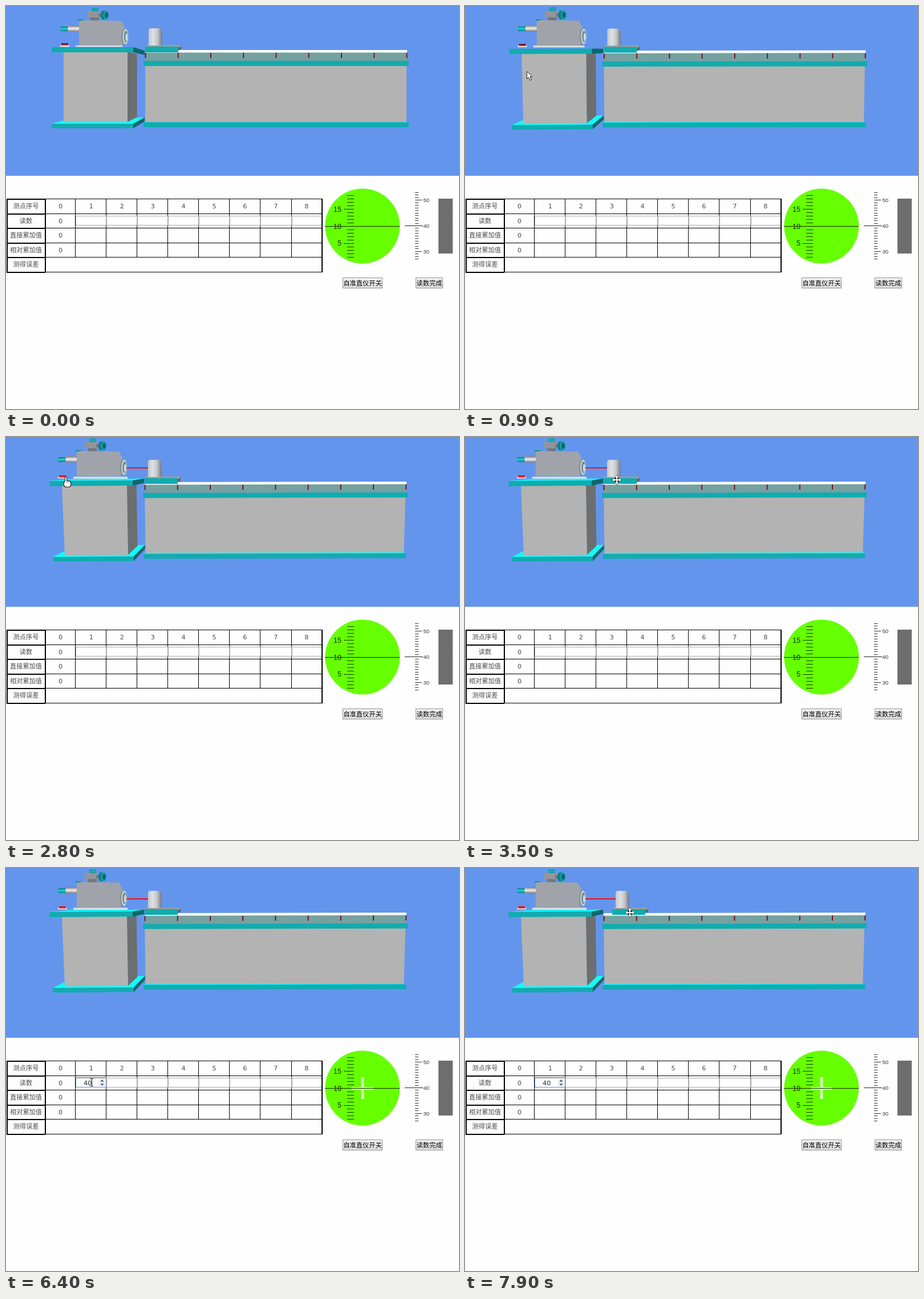
Write an HTML page with a canvas that moves like this. It is 794 px wide and 705 px high and loops after 8 s.

```html
<!DOCTYPE html>
<html lang="zh">
<head>
<meta charset="utf-8">
<style>
html, body { margin: 0; width: 100%; height: 100%; overflow: hidden; background: #fefefe; }
canvas { display: block; }
</style>
</head>
<body>
<canvas id="stage" width="794" height="705"></canvas>
<script>
const ctx = document.getElementById('stage').getContext('2d');
const LOOP = 8000, STEP = 100;
const TEAL = '#11acae', CYAN = '#14fafa', DARK_TEAL = '#0b686a', GREY = '#b3b3b3';
const SANS = '"DejaVu Sans", "Noto Sans CJK SC", "Noto Sans CJK", sans-serif';
const ARIAL = '"Liberation Sans", sans-serif';

// Pointer moves: start, end, target x, target y
const MOVES = [
  [100, 700, 116, 129], [700, 1300, 91, 83], [1300, 1600, 93, 68], [2000, 2100, 97, 67],
  [2700, 2800, 105, 69], [2800, 3200, 363, 62], [3200, 3500, 266, 75],
  [4100, 4300, 418, 310], [4300, 4500, 357, 366], [4500, 4900, 146, 375],
  [5300, 5500, 150, 375], [6900, 7000, 129, 375], [7200, 7600, 275, 78], [7600, 7900, 289, 78]
];

const mix = (a, b, k) => a + (b - a) * k;
const ramp = (t, a, b) => Math.max(0, Math.min(1, (t - a) / (b - a)));
const smooth = v => v * v * (3 - 2 * v);
const inside = (x, y, l, t, r, b) => x >= l && x <= r && y >= t && y <= b;
const colX = i => Math.floor(67.6 + i * 54.05);
const rowY = i => Math.round(337 + i * 25.6);

function rect(color, x, y, w, h) {
  ctx.fillStyle = color;
  ctx.fillRect(x, y, w, h);
}

function frame(color, x, y, w, h) {
  ctx.strokeStyle = color;
  ctx.lineWidth = 1;
  ctx.strokeRect(x + 0.5, y + 0.5, w - 1, h - 1);
}

function line(x1, y1, x2, y2, color = '#000', width = 1) {
  ctx.strokeStyle = color;
  ctx.lineWidth = width;
  ctx.beginPath();
  ctx.moveTo(x1, y1);
  ctx.lineTo(x2, y2);
  ctx.stroke();
}

function shape(points, fill, stroke) {
  ctx.beginPath();
  for (const [x, y] of points) ctx.lineTo(x, y);
  ctx.closePath();
  ctx.fillStyle = fill;
  ctx.fill();
  if (!stroke) return;
  ctx.strokeStyle = stroke;
  ctx.lineWidth = 1;
  ctx.stroke();
}

function ellipse(color, x, y, rx, ry) {
  ctx.fillStyle = color;
  ctx.beginPath();
  ctx.ellipse(x, y, rx, ry, 0, 0, 7);
  ctx.fill();
}

function text(str, x, y, size = 11.2, color = '#4a4a4a', font = SANS, align = 'center') {
  ctx.font = size + 'px ' + font;
  ctx.fillStyle = color;
  ctx.textAlign = align;
  ctx.fillText(str, x, y);
}

function shade(x1, y1, x2, y2, ...colors) {
  const g = ctx.createLinearGradient(x1, y1, x2, y2);
  colors.forEach((c, i) => g.addColorStop(i / (colors.length - 1), c));
  return g;
}

// Front-plane point seen after the camera has turned by k; the pillar stands nearer
function turn(k, x, y) {
  const low = (y - 76) / 134;
  const dx = mix(Math.min(-1, x / 55 - 5), 3.5 - x * 0.012, low);
  const dy = (x < 240 ? 5.6 - x / 140 : 2.5 - x / 460) - low;
  return [x + k * dx, y + k * dy];
}

// Cuboid whose depth edges run to the vanishing point
function block(k, x, y, w, h, depth, front, top = CYAN, side = DARK_TEAL) {
  const horizon = mix(119, 50, k);
  const face = [[x, y], [x + w, y], [x + w, y + h], [x, y + h]].map(p => turn(k, ...p));
  const [a, b, c] = face;
  const [a2, b2, c2] = face.map(([px, py]) => [mix(px, 380, depth), mix(py, horizon, depth)]);
  if (a2[1] < a[1]) shape([a, a2, b2, b], top);
  if (b2[0] > b[0]) shape([b, b2, c2, c], side);
  shape(face, front);
}

function drawPillar(k) {
  block(k, 80, 206, 143, 8, 0.127, TEAL);
  block(k, 101, 80, 112, 123, 0.1, GREY, GREY, '#6c6f70');
  block(k, 80, 72, 143, 9, 0.127, TEAL);
}

function drawRail(k) {
  block(k, 244, 104, 458, 99, 0, GREY);
  block(k, 241, 203.5, 465, 8.5, 0.012, TEAL);
  block(k, 241, 96, 465, 9, 0, TEAL);
  block(k, 244, 81, 459, 15, 0, '#75a1a1');
  block(k, 244, 77, 459, 4.5, 0, '#fff');
  for (let i = 0; i < 9; i++) {
    const x = 244.5 + i * 57.25;
    line(...turn(k, x, 82), ...turn(k, x, 91), '#7c1212', 2);
  }
}

function drawCarriage(k, slide) {
  ctx.save();
  ctx.translate(slide - k, k);
  shape([[301, 69], [307, 69], [307, 76], [301, 78]], '#59666e');
  rect('#989ca1', 246, 68, 60, 4);
  rect(TEAL, 244, 71, 58, 10);
  ctx.fillStyle = shade(250, 0, 274, 0, '#c4c7cb', '#dfe1e4', '#c2c5c9', '#6f757b');
  ctx.beginPath();
  ctx.roundRect(250, 39, 23.5, 30, [4, 6, 0, 0]);
  ctx.fill();
  ctx.restore();
}

function tube(x, y, w, h, dark, light) {
  rect(shade(0, y, 0, y + h, dark, light, dark), x, y, w, h);
}

function drawInstrument(k, lit) {
  ctx.save();
  ctx.translate(-4 * k, -0.5 * k);
  rect('#238f92', 126, 23.5, 11, 2.5);
  rect('#73787d', 148, 19, 15, 8);
  shape([[128, 27], [134, 25], [202, 26], [208, 37], [205, 69], [128, 69]], '#a0a4aa');
  rect('#92969c', 142, 9, 23, 11);
  tube(150, 3, 12, 6, '#128e92', '#1cb4b6');
  rect('#73787d', 162, 13, 6, 6);
  ellipse('#0b7d82', 171, 16, 5, 8);
  ellipse('#139fa4', 175, 16, 5, 8);
  ellipse('#0a6469', 176, 16, 3, 5);
  tube(108, 34, 20, 11, '#7c7c7c', '#f0f0f0');
  tube(95.5, 36, 13, 8, '#0a7477', '#19dada');
  rect('#dfe1e3', 122, 69 + k, mix(82, 95, k), 2.5 + k);
  rect('#dedede', 95, 68.5 + 1.5 * k, 16, 3);
  rect(lit ? '#f01010' : '#941018', 97, 65 + 2.5 * k, 12, 3.5);
  ctx.restore();
  const x = 207.5 - 2.5 * k, y = 53.5 - 0.5 * k;
  ellipse('#828a8e', x, y, 5, 14);
  ellipse('#c3cfd0', x + 2, y, 5, 13.5);
  ellipse('#64868a', x + 2.8, y, 3.4, 10);
  ellipse('#cfdddd', x + 3.8, y + 1, 2, 7);
}

function drawScene(t, slide) {
  const k = smooth(ramp(t, 700, 1050));
  const lit = t >= 2400;
  rect('#6495ed', 0, 0, 794, 297);
  drawPillar(k);
  drawRail(k);
  drawInstrument(k, lit);
  if (lit) line(211, 54, 250 + slide, 54, '#e8141f', 2);
  drawCarriage(k, slide);
}

function drawTable() {
  for (let i = 0; i < 6; i++) {
    rect('#000', 1, rowY(i), 553, 1);
    rect('#000', 1, rowY(i), 68, 2);
  }
  for (let i = 1; i < 9; i++) rect('#000', colX(i), 337, 1, 102);
  for (let i = 1; i < 9; i++) {
    const x = colX(i) + 1, w = colX(i + 1) - x + 1;
    rect('#fff', x, 367, w, 17);
    frame('#aaa', x, 367, w, 17);
  }
  for (const x of [1, 68, 553]) rect('#000', x, 337, 2, 129);
  ['测点序号', '读数', '直接累加值', '相对累加值', '测得误差'].forEach((label, i) =>
    text(label, 35, 354.3 + i * 25.5));
  for (let i = 0; i < 9; i++) text(i, 95.5 + i * 53.9, 354);
  for (let i = 1; i < 4; i++) text('0', 95.5, 354.3 + i * 25.5);
}

function drawEntry(t) {
  if (t < 5000) return;
  frame('#5b8fe6', 122, 366, 54, 18);
  rect('#ececec', 163, 369, 11, 13);
  for (const s of [-1, 1]) shape([[165.5, 375.5 + s * 2], [168.5, 375.5 + s * 5], [171.5, 375.5 + s * 2]], '#444');
  const typed = '40'.slice(0, Math.max(0, (t - 6200) / 100));
  text(typed, 143.2, 380, 11.2, '#222');
  const blinkStart = t < 6300 ? 5000 : 6400;
  if (t < blinkStart || (t - blinkStart) % 1000 < 500) {
    rect('#000', 143 + Math.round(typed.length * 3.56), 368, 1, 14);
  }
}

function drawScope(t) {
  ellipse('#66ff00', 624.8, 385, 65.5, 65.5);
  for (let n = 1; n < 20; n++) {
    const y = Math.round(385 - (n - 10) * 5.95);
    const x = n % 5 ? 598 : 592;
    rect('#16380a', x, y, 610 - x, 1);
  }
  for (const n of [5, 10, 15]) text(n, 588, 389.5 - (n - 10) * 5.95, 12.5, '#16300a', ARIAL, 'right');
  if (t >= 3800) {
    rect('#d5ffb8', 622.5, 366, 5, 38);
    rect('#c6ff9c', 606, 383, 38, 5);
  }
  rect('#142808', 559, 385, 131, 1);
}

function drawVernier() {
  for (let n = 27; n <= 53; n++) {
    rect('#333', 717, Math.round(384 - (n - 40) * 4.46), n % 10 ? 6 : 12, 1);
  }
  rect('#222', 699, 384, 32, 1);
  for (const n of [30, 40, 50]) text(n, 731.5, 388 - (n - 40) * 4.46, 9.5, '#333', ARIAL, 'left');
  rect('#a8a8a8', 758, 337, 25, 96);
  for (let y = 0; y < 96; y++)
    for (let x = y % 2; x < 25; x += 2) rect('#333', 758 + x, 337 + y, 1, 1);
}

function drawButton(label, x, w) {
  rect(shade(0, 476, 0, 494, '#f4f4f4', '#dcdcdc'), x, 475, w, 19);
  frame('#929292', x, 475, w, 19);
  text(label, x + w / 2, 489, 11.2, '#000');
}

const POINTERS = {
  arrow() {
    shape([[0.5, 0.5], [0.5, 13.5], [3.5, 10.5], [6, 16], [8.5, 15], [6, 9.5], [10, 9.5]], '#fff', '#222');
  },
  hand() {
    for (const [color, grow] of [['#222', 1], ['#fff', 0]]) {
      ctx.fillStyle = color;
      ctx.beginPath();
      ctx.roundRect(-1 - grow, 1 - grow, 2 + grow * 2, 12, 1);
      ctx.roundRect(-3 - grow, 8 - grow, 11 + grow * 2, 10 + grow * 2, 4);
      ctx.fill();
    }
    for (const x of [2, 4.5]) line(x, 8, x, 11, '#222', 0.7);
  },
  move() {
    for (const [color, grow] of [['#222', 1], ['#fff', 0]])
      for (let i = 0; i < 4; i++) {
        rect(color, -1 - grow, -6, 2 + grow * 2, 6);
        shape([[-3 - grow, -4 + grow], [0, -8 - grow], [3 + grow, -4 + grow]], color);
        ctx.rotate(Math.PI / 2);
      }
  },
  beam() {
    rect('#111', 0, -6, 1, 12);
    for (const y of [-7, 6]) rect('#333', -3, y, 6, 1);
  }
};

function pointerKind(x, y, slide) {
  if (inside(x, y, 95, 64, 108, 75)) return 'hand';
  if (inside(x, y, 122, 366, 176, 384)) return 'beam';
  if (inside(x, y, 244 + slide, 71, 302 + slide, 83)) return 'move';
  return 'arrow';
}

function drawPointer(t, slide) {
  if (t < 100) return;
  let x = 190, y = 190;
  for (const [from, to, tx, ty] of MOVES) {
    const k = ramp(t, from, to);
    x = mix(x, tx, k);
    y = mix(y, ty, k);
  }
  ctx.save();
  ctx.translate(Math.round(x), Math.round(y));
  POINTERS[pointerKind(x, y, slide)]();
  ctx.restore();
}

function render(now) {
  const t = Math.floor(now % LOOP / STEP) * STEP;
  const slide = 15 * ramp(t, 7600, 7900);
  rect('#fefefe', 0, 0, 794, 705);
  drawScene(t, slide);
  drawTable();
  drawEntry(t);
  drawScope(t);
  drawVernier();
  drawButton('自准直仪开关', 590, 70);
  drawButton('读数完成', 718, 48);
  drawPointer(t, slide);
}

const start = performance.now();
function tick() {
  render(performance.now() - start);
  requestAnimationFrame(tick);
}
tick();
</script>
</body>
</html>
```
